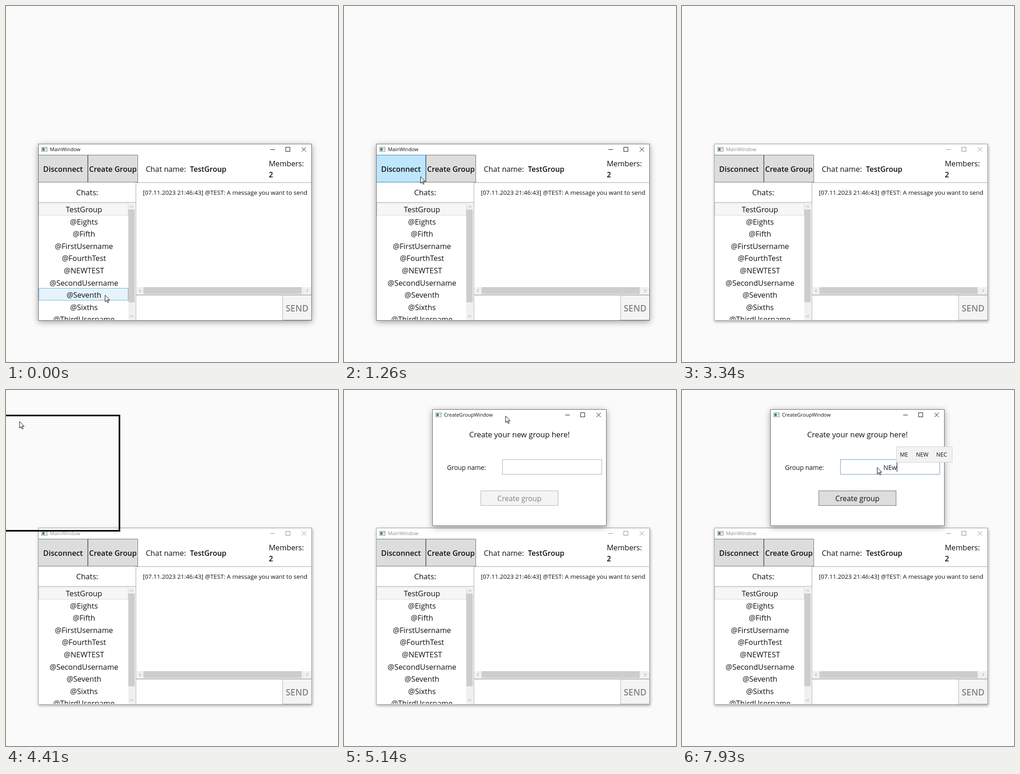
Recreate the animation shown at these times as an HTML page. Size 722 px wide and 775 px high, loop 8000 ms.

```html
<!DOCTYPE html>
<html lang="en">
<head>
<meta charset="utf-8">
<title>Group chat</title>
<style>
html, body { margin: 0; width: 100%; height: 100%; overflow: hidden; background: #fafafa; }
svg { display: block; width: 722px; height: 775px; }
text { font-family: "Open Sans", "Noto Sans", sans-serif; fill: #111; white-space: pre; }
rect, .crisp { shape-rendering: crispEdges; }
#outline { shape-rendering: geometricPrecision; }
.bold { font-weight: 600; }
.mid { text-anchor: middle; }
.line { fill: none; stroke-width: 1; }
.caption { --ink: #111; --edge: #6c6c6c; }
.caption.idle { --ink: #8e8e8e; --edge: #a2a2a2; }
.caption .title { fill: var(--ink); }
.caption .tools { stroke: var(--ink); }
.caption .frame { stroke: var(--edge); }
.shade { filter: drop-shadow(0 3px 7px rgba(0, 0, 0, .36)); }
.shade.idle { filter: drop-shadow(1px 2px 3px rgba(0, 0, 0, .36)); }
.shade.none { filter: none; }
.btn rect { fill: #ddd; stroke: #707070; }
.btn.hot rect { fill: #bee6fd; stroke: #3c7fb1; }
.btn.off rect { fill: #f4f4f4; stroke: #adb2b5; }
.btn.off text { fill: #838383; }
</style>
</head>
<body>
<svg id="stage" viewBox="0 0 722 775"></svg>
<script>
const LOOP = 8000;
const CHATS = ["TestGroup", "@Eights", "@Fifth", "@FirstUsername", "@FourthTest", "@NEWTEST",
  "@SecondUsername", "@Seventh", "@Sixths", "@ThirdUsername"];
const ROW = 26.6;

const box = (x, y, w, h, fill, stroke = "none", more = "") =>
  `<rect x="${x}" y="${y}" width="${w}" height="${h}" fill="${fill}" stroke="${stroke}" ${more}/>`;
const label = (x, y, size, str, cls = "", more = "") =>
  `<text x="${x}" y="${y}" font-size="${size}" class="${cls}" ${more}>${str}</text>`;
const line = (d, stroke, cls = "crisp") => `<path class="line ${cls}" d="${d}" stroke="${stroke}"/>`;
const button = (id, x, y, w, h, str, size, base, cls = "") =>
  `<g id="${id}" class="btn ${cls}">${box(x, y, w, h, "#ddd", "#707070")}` +
  label(x + w / 2, base, size, str, id === "make" ? "mid" : "mid bold") + `</g>`;

// Window frame with icon, title and the three caption buttons
function frame(id, x, y, w, h, title, body) {
  const r = x + w, c = y + 12;
  return `<g id="${id}" class="caption">
    <rect id="${id}Shade" class="shade" x="${x}" y="${y}" width="${w}" height="${h}" fill="#fff"/>
    ${box(x + 7.5, y + 7.5, 12, 9, "#f4f6f7", "#8b9196")}
    ${box(x + 9, y + 9, 5, 6, "#3f8584")}${box(x + 16, y + 9, 2, 4, "#b9c2c8")}
    ${label(x + 25.5, c + 4, 10.85, title, "title")}
    <path class="line tools crisp" d="M${r - 90} ${c + .5}h10M${r - 56.5} ${c - 4.5}h9v9h-9z"/>
    <path class="line tools" d="M${r - 22} ${c - 4.5}l9.5 9.5m0 -9.5l-9.5 9.5"/>
    ${body}
    <rect class="frame" x="${x + .5}" y="${y + .5}" width="${w - 1}" height="${h - 1}" fill="none"/>
  </g>`;
}

const rows = CHATS.map((name, i) => label(169.5, 449 + i * ROW, 16.35, name, "mid")).join("");

const mainBody =
  button("leave", 70.5, 324.5, 107, 59, "Disconnect", 16.2, 361) +
  button("create", 178.5, 324.5, 108, 59, "Create Group", 16.1, 361) +
  label(304, 361, 16.35, "Chat name:") + label(400, 361, 16, "TestGroup", "bold") +
  label(571.5, 349, 16.2, "Members:") + label(571.5, 373, 16.2, "2", "bold") +
  label(176.5, 412, 16.6, "Chats:", "mid") +
  line("M71 427.5H283M283 384.5H664M282.5 385V684", "#a3a5a8") +
  `<clipPath id="listClip"><rect x="71" y="428" width="211" height="255"/></clipPath>
  <g clip-path="url(#listClip)">
    ${box(71.5, 429.5, 194, 26, "#f6f6f6", "#dadada")}
    ${box(71.5, 0, 194, 26, "#e5f3fb", "#70b6d8", 'id="hover"')}
    ${rows}
  </g>` +
  box(266, 429, 15, 254, "#f0f0f0") + box(266, 443, 14, 202, "#cdcdcd") +
  line("M270 438.500l3.200 -3.200l3.200 3.200M270 673.500l3.200 3.200l3.200 -3.200", "#8a8a8a", "") +
  label(297.5, 411, 13.18, "[07.11.2023 21:46:43] @TEST: A message you want to send") +
  box(284, 612, 380, 15, "#f0f0f0") + box(299, 612, 344, 15, "#cdcdcd") +
  line("M293 616.500l-3.200 3.200l3.200 3.200M653.500 616.500l3.200 3.200l-3.200 3.200", "#8a8a8a", "") +
  box(283, 628, 381, 2, "#b2b4b7") +
  button("send", 601.5, 629.5, 63, 54, "SEND", 18.9, 665, "off");

const dialogBody =
  label(381.5, 103, 16.43, "Create your new group here!", "mid") +
  label(224, 174, 13.8, "Group name:") +
  box(344.5, 151.5, 216, 32, "#fff", "#abadb3", 'id="field"') +
  label(452.5, 174, 13.9, "", "mid", 'id="typed"') +
  box(452, 158, 1, 20, "#000", "none", 'id="caret"') +
  button("make", 297.5, 219.5, 168, 32, "Create group", 15.8, 242, "off");

document.getElementById("stage").innerHTML =
  box(0, 0, 722, 775, "#fafafa") +
  frame("main", 70, 300, 595, 385, "MainWindow", mainBody) +
  frame("dialog", 192, 42, 379, 254, "CreateGroupWindow", dialogBody) +
  box(0, 0, 375.4, 251, "none", "#000", 'id="outline" stroke-width="3.4"') +
  `<g id="tips">${box(0, 123.5, 0, 34, "#f2f2f2", "#cfcfcf", 'id="tipBox"')}
    ${[0, 1, 2].map(i => label(0, 145, 12, "", "", `id="tip${i}"`)).join("")}</g>
  <g id="arrow">
    <path d="M1.500 2V16.200L4.800 13.200L7 18.200L9.200 17.300L7 12.400H11.800Z" fill="#000" opacity=".25"/>
    <path d="M.5 .5V14.600L3.700 11.600L6 16.800L8.100 15.900L5.800 10.900H10.300Z" fill="#fff" stroke="#111"/>
  </g>
  <path id="beam" class="line" d="M-3 -7.500h2.500l.5 .5l.5 -.5h2.500M0 -7V7M-3 7.500h2.500l.5 -.5l.5 .5h2.500" stroke="#111"/>`;

const el = {};
document.querySelectorAll("[id]").forEach(e => el[e.id] = e);

// Pointer moves: start, end, number of steps, then [step, x, y] keys
const MOVES = [
  [80, 780, 10, [[0, 213, 612], [2, 203, 520], [5, 182, 396], [7, 166, 380], [9, 150, 373]]],
  [1030, 1810, 11, [[0, 152, 373], [5, 176, 370], [10, 212, 364]]],
  [1890, 2440, 8, [[0, 213, 356], [3, 225, 340], [5, 250, 339], [7, 234, 349]]],
  [3200, 3340, 3, [[0, 190, 336], [1, 87, 314], [2, -60, 290]]],
  [4410, 4810, 6, [[0, 29, 68], [2, 230, 68], [3, 315, 66], [4, 345, 59], [5, 351, 56]]],
  [5140, 5920, 11, [[0, 351, 56], [2, 360, 75], [6, 405, 140], [10, 424, 168]]],
  [6250, 6320, 2, [[0, 424, 169], [1, 424, 168]]]
];

function pointer(t) {
  const move = MOVES.filter(m => t >= m[0]).pop();
  if (!move) return [215, 629];
  const [start, end, n, keys] = move;
  const k = Math.min(n - 1, Math.floor((t - start) / (end - start) * (n - 1) + .15));
  const j = Math.max(1, keys.findIndex(p => p[0] >= k));
  const [a, b] = [keys[j - 1], keys[j]];
  const f = (k - a[0]) / (b[0] - a[0]);
  return [1, 2].map(i => Math.round(a[i] + (b[i] - a[i]) * f));
}

// Suggestion popups: time, left, width, words and their positions
const TIPS = [
  [7620, 462.5, 137, ["NET", "NEW", "NEED"], [471, 510, 554]],
  [7930, 466.5, 121, ["ME", "NEW", "NEC"], [474, 509, 553]]
];
const TYPING = [[0, ""], [7460, "N"], [7540, "NE"], [7770, "NEw"]];

const latest = (table, t) => table.filter(r => t >= r[0]).pop();
const show = (e, on) => e.setAttribute("visibility", on ? "visible" : "hidden");
const place = (e, x, y) => e.setAttribute("transform", `translate(${x} ${y})`);

function draw(t) {
  const [x, y] = pointer(t);
  const live = t < 2950;
  const inside = (l, top, r, b) => x >= l && x < r && y >= top && y < b;

  el.main.classList.toggle("idle", !live);
  el.mainShade.classList.toggle("idle", t >= 3030);
  el.leave.classList.toggle("hot", live && inside(70, 324, 178, 384));
  el.create.classList.toggle("hot", live && inside(178, 324, 287, 384));
  const row = Math.floor((y - 429) / ROW);
  show(el.hover, live && inside(72, 429, 266, 683));
  el.hover.setAttribute("y", Math.round(429 + row * ROW) - .5);

  const dragging = t >= 4410 && t < 4810;
  show(el.outline, dragging);
  place(el.outline, x - 157.7, y - 12.5);

  const open = t >= 4810;
  el.dialog.style.display = open ? "" : "none";
  el.dialogShade.classList.toggle("none", t < 5140);

  const over = open && inside(344, 151, 561, 184);
  const focus = t >= 6080;
  el.field.setAttribute("stroke", focus ? "#5f9bc9" : over ? "#7eb4ea" : "#abadb3");
  const word = latest(TYPING, t)[1];
  if (el.typed.textContent !== word) el.typed.textContent = word;
  const half = word && open ? el.typed.getComputedTextLength() / 2 : 0;
  el.caret.setAttribute("x", Math.round(452 + half));
  el.caret.style.display = focus && (t < 6650 || t >= 7130) ? "" : "none";
  el.make.classList.toggle("off", !word);

  const tip = latest(TIPS, t);
  show(el.tips, tip);
  if (tip) {
    el.tipBox.setAttribute("x", tip[1]);
    el.tipBox.setAttribute("width", tip[2]);
    tip[3].forEach((s, i) => {
      el["tip" + i].textContent = s;
      el["tip" + i].setAttribute("x", tip[4][i]);
    });
  }

  const beam = over && t < 7540;
  show(el.beam, beam);
  show(el.arrow, !beam);
  place(el.beam, x + .5, y + 2);
  place(el.arrow, x, y);
}

function tick() {
  draw(performance.now() % LOOP);
  requestAnimationFrame(tick);
}
tick();
</script>
</body>
</html>
```
